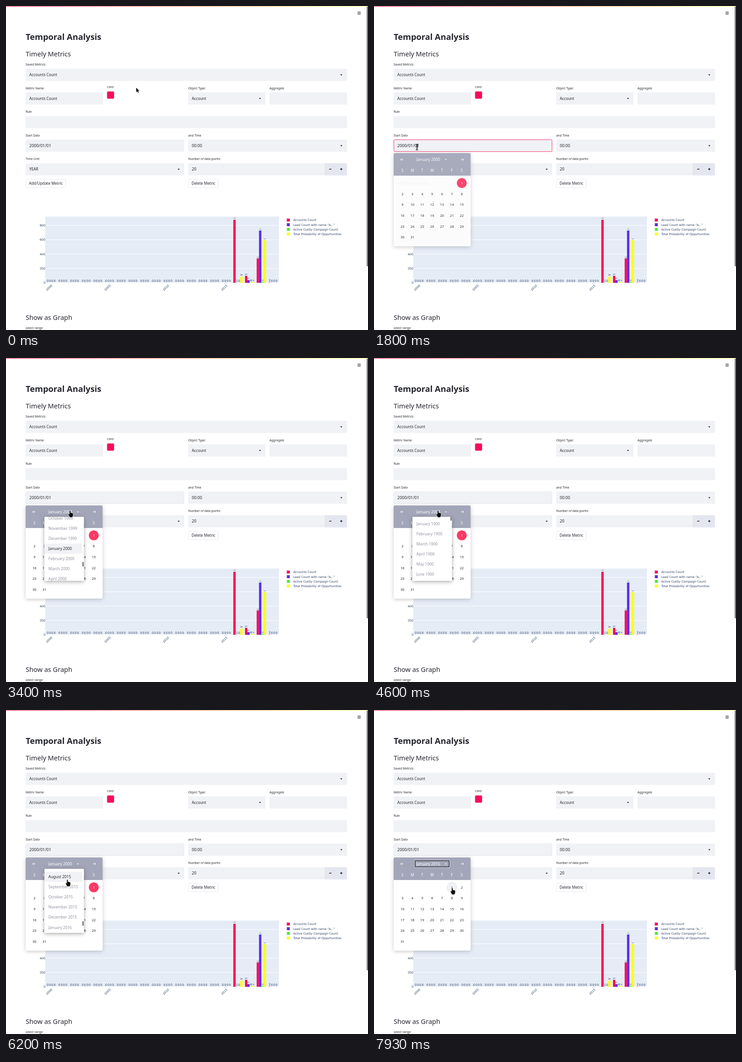
Write an HTML page with a canvas that moves like this. It is 792 px wide and 707 px high and loops after 8000 ms.

```html
<!DOCTYPE html>
<html lang="en">
<head>
<meta charset="utf-8">
<title>Temporal Analysis</title>
<style>
html, body { margin: 0; width: 100%; height: 100%; overflow: hidden; background: #fff; }
canvas { display: block; }
</style>
</head>
<body>
<canvas id="stage" width="792" height="707"></canvas>
<script>
const ctx = document.getElementById('stage').getContext('2d');
const LOOP = 8000, STEP = 200 / 3;
const SANS = '"Noto Sans", "Open Sans", sans-serif', CHART = '"DejaVu Sans", sans-serif';
const INK = '#262730', FIELD = '#f0f2f6', PINK = '#f63366', SLATE = '#2a3f5f';
const SERIES = [
  ['Accounts Count', '#f8065c'],
  ['Lead Count with name "A..."', '#5a2de0'],
  ['Active Costly Campaign Count', '#55ec38'],
  ['Total Probability of Opportunities', '#ffff00']
];
const COUNTS = { 16: [878, 1, 0, 86], 17: [97, 37, 4, 10], 18: [340, 728, 11, 597], 19: [3, 0, 0, 0] };
const MONTHS = ['January', 'February', 'March', 'April', 'May', 'June', 'July',
  'August', 'September', 'October', 'November', 'December'];

// Pointer path: time, x, y
const PATH = [
  [0, 285, 178], [330, 225, 290], [530, 150, 374], [667, 118, 366], [867, 185, 330],
  [1200, 94, 308], [2067, 94, 308], [2333, 150, 342], [2400, 150, 342], [2733, 140, 333],
  [6000, 140, 333], [6733, 119, 469], [7067, 119, 469], [7200, 119, 458], [7933, 171, 388]
];
// List jumps: time, active month counted from January 1900, its row centre
const JUMPS = [[3000, 1200, 416], [4600, 0, 362], [4860, 1200, 474.5], [5030, 1320, 474.5], [5320, 1392, 474.5]];
const OPEN = 1733, FOCUS = 2733, LIST = 3200, PICK = 7260;
const ROW = 22.07;

const clamp = v => Math.max(0, Math.min(1, v));

function box(x, y, x2, y2, fill, r = 2) {
  ctx.beginPath();
  ctx.roundRect(x, y, x2 - x, y2 - y, r);
  if (fill) { ctx.fillStyle = fill; ctx.fill(); }
}
function frame(x, y, x2, y2, color, width = 1, r = 2) {
  box(x, y, x2, y2, null, r);
  ctx.strokeStyle = color;
  ctx.lineWidth = width;
  ctx.stroke();
}
function line(color, width, ...pts) {
  ctx.beginPath();
  for (let i = 0; i < pts.length; i += 2) ctx.lineTo(pts[i], pts[i + 1]);
  ctx.strokeStyle = color;
  ctx.lineWidth = width;
  ctx.stroke();
}
function text(s, x, cy, size, { color = INK, align = 'left', weight = 400, family = SANS } = {}) {
  ctx.font = `${weight} ${size}px ${family}`;
  ctx.fillStyle = color;
  ctx.textAlign = align;
  ctx.fillText(s, x, cy + size * 0.36);
}
function caret(x, y, color = '#111') {
  ctx.fillStyle = color;
  ctx.beginPath();
  ctx.moveTo(x - 2.3, y - 1.1);
  ctx.lineTo(x + 2.3, y - 1.1);
  ctx.lineTo(x, y + 1.3);
  ctx.fill();
}
function shadowed(blur, alpha, draw) {
  ctx.save();
  ctx.shadowColor = `rgba(0,0,0,${alpha})`;
  ctx.shadowBlur = blur;
  ctx.shadowOffsetY = 2;
  draw();
  ctx.restore();
}
const label = (s, x, cy) => text(s, x, cy, 6.55);
function field(x, x2, y, value = '', drop = false, size = 8.27) {
  box(x, y, x2, y + 26.5, FIELD);
  text(value, x + 8, y + 13.3, size);
  if (drop) caret(x2 - 12.3, y + 13.4);
}
function button(s, x, x2) {
  frame(x + .5, 378, x2, 396.5, '#e6e8ef');
  text(s, x + 7.2, 387.3, 8.27);
}

function drawPage() {
  ctx.fillStyle = '#fff';
  ctx.fillRect(0, 0, 792, 707);
  const g = ctx.createLinearGradient(0, 0, 792, 0);
  g.addColorStop(0, PINK);
  g.addColorStop(1, '#fffd80');
  ctx.fillStyle = g;
  ctx.fillRect(0, 0, 792, 1.2);
  box(789, 1, 793, 568, '#808080', 1.5);
  for (const y of [13, 15.6, 18.2]) line('#333', 1.1, 769, y, 776, y);

  text('Temporal Analysis', 43, 67, 18.25, { weight: 700 });
  text('Timely Metrics', 43, 105, 14.55);
  label('Saved Metrics:', 43, 128);
  field(43, 746, 137, 'Accounts Count', true);
  label('Metric Name', 43, 179.5);
  field(43, 212.3, 188.5, 'Accounts Count');
  label('color', 221, 177);
  box(220.6, 186, 237, 202.8, '#f9b4cc', 2.5);
  box(221.3, 186.7, 236.3, 202.1, '#f50d5c');
  label('Object Type:', 398.7, 179.5);
  field(398.5, 568, 188.5, 'Account', true);
  label('Aggregate', 576.5, 179.5);
  field(576.5, 746, 188.5);
  label('Rule', 43, 231);
  field(43, 746, 240);
  label('Start Date', 43, 282.3);
  field(43, 390, 291.5, '2000/01/01', false, 9);
  label('and Time', 398.7, 282.3);
  field(398.5, 746, 291.5, '00:00', true, 8.8);
  label('Time Unit:', 43, 334);
  field(43, 390, 343, 'YEAR', true);
  label('Number of data points', 398.7, 334);
  field(398.5, 746, 343, '20', false, 8.8);
  box(697, 343, 746, 369.5, '#e4e6f0');
  line('#111', 1.3, 707, 356, 712, 356);
  line('#111', 1.3, 731, 356, 736, 356);
  line('#111', 1.3, 733.5, 353.5, 733.5, 358.5);
  button('Add/Update Metric', 43, 130.5);
  button('Delete Metric', 398.7, 464.5);
  text('Show as Graph', 43, 680, 14.55);
  label('select range', 43, 702.5);
}

function drawChart() {
  const left = 86, right = 597, base = 604, unit = 0.1566, size = 6.46;
  const year = (right - left) / 20, bar = year * 0.2;
  const font = { family: CHART, color: SLATE };
  ctx.fillStyle = '#e5ecf6';
  ctx.fillRect(left, 459.5, right - left, base - 459.5);
  for (let v = 0; v <= 800; v += 200) {
    const y = base - v * unit;
    line('#fff', 1, left, y, right, y);
    text(v, left, y, size, { ...font, align: 'right' });
  }
  for (let i = 0; i < 20; i++) {
    (COUNTS[i] || [0, 0, 0, 0]).forEach((v, k) => {
      const x = left + year * (i + 0.1) + bar * k, top = base - v * unit;
      ctx.fillStyle = SERIES[k][1];
      ctx.fillRect(x, top, bar, base - top);
      const s = Math.min(size, bar / (String(v).length * 0.636));
      text(v, x + bar / 2, top - s * 0.4 - 1.9, s, { ...font, align: 'center' });
    });
    if (i % 5 === 0) {
      ctx.save();
      ctx.translate(left + year * (i + 0.5) - 4.4, 614.7);
      ctx.rotate(-Math.PI / 4);
      text(2000 + i, 0, 0, size, { ...font, align: 'center' });
      ctx.restore();
    }
  }
  SERIES.forEach(([name, color], k) => {
    const y = 467 + k * 10.2;
    ctx.fillStyle = color;
    ctx.fillRect(614.4, y - 3.2, 6.5, 6.5);
    text(name, 628.4, y, size, font);
  });
}

function drawCalendar(t) {
  const u = clamp((t - OPEN + STEP) / 180), shown = 1 - (1 - u) ** 2;
  const picked = t >= PICK, white = { color: '#fff', align: 'center' };
  const colX = c => 62.3 + c * 21.62;
  ctx.save();
  ctx.globalAlpha = shown;
  ctx.translate(0, -11 * (1 - shown));
  shadowed(9, 0.2, () => box(43, 321.7, 211.4, 525, '#fff'));
  box(43, 321.7, 211.4, 371, '#a3a6b8', [2, 2, 0, 0]);
  for (const [x, d] of [[61.3, -1], [193, 1]]) {
    line('#fff', 1, x - 3 * d, 335.7, x + 3 * d, 335.7);
    line('#fff', 1, x + .4 * d, 333, x + 3 * d, 335.7, x + .4 * d, 338.4);
  }
  text(picked ? 'January 2016' : 'January 2000', 92.7, 335.7, 8.5, { color: '#fff', weight: 500 });
  caret(157.2, 336, '#fff');
  [...'SMTWTFS'].forEach((d, c) => text(d, colX(c), 360, 8, white));
  const first = picked ? 5 : 6;
  for (let d = 1; d <= 31; d++) {
    const cell = first + d - 1, x = colX(cell % 7), y = 387 + Math.floor(cell / 7) * 23.65;
    const selected = !picked && d === 1, hover = t > 7860 && d === 1;
    if (selected || hover) {
      ctx.beginPath();
      ctx.arc(x, y, 10.8, 0, 7);
      ctx.fillStyle = selected ? '#fb3a66' : FIELD;
      ctx.fill();
      if (hover) { ctx.strokeStyle = '#dcdee6'; ctx.lineWidth = 0.8; ctx.stroke(); }
    }
    text(d, x, y, 7.5, { align: 'center', color: selected ? '#fff' : INK });
  }
  if ((t >= FOCUS && t < LIST - 5) || picked) {
    frame(88.7, 327.7, 165.5, 343.3, '#fff', 1);
    frame(89.7, 328.7, 164.5, 342.3, '#10121a', 1.3);
  }
  ctx.restore();
}

function drawList(t, pointer) {
  const [since, anchor, anchorY] = JUMPS.filter(j => j[0] <= t).pop();
  const top = 346.6, bottom = 486.3;
  let active = anchor;
  if (t > 6000 && t < 7130 && pointer.y > top)
    active = Math.min(anchor, anchor + Math.round((pointer.y - anchorY) / ROW));
  const glow = clamp((t - since) / 200);
  ctx.save();
  ctx.globalAlpha = clamp((t - LIST + STEP + 5) / 260);
  shadowed(8, 0.35, () => box(84, top, 170.5, bottom, '#fff'));
  box(84, top, 170.5, bottom);
  ctx.clip();
  const alpha = ctx.globalAlpha;
  for (let k = -7; k <= 7; k++) {
    const i = anchor + k, y = anchorY + k * ROW;
    if (i < 0 || y < top - 12 || y > bottom + 12) continue;
    const name = `${MONTHS[i % 12]} ${1900 + Math.floor(i / 12)}`;
    text(name, 92.8, y, 8.41, { color: '#9192a0' });
    if (i === active) {
      ctx.globalAlpha = alpha * glow;
      ctx.fillStyle = '#f1f2f5';
      ctx.fillRect(84, y - ROW / 2, 83, ROW);
      text(name, 92.8, y, 8.41);
      ctx.globalAlpha = alpha;
    }
  }
  box(167, 345 + anchor / 12, 170, 355 + anchor / 12, '#808080', 1.2);
  ctx.restore();
}

function pointerAt(t) {
  const n = PATH.findIndex(p => p[0] > t);
  const b = PATH[n < 0 ? PATH.length - 1 : n], a = PATH[n < 0 ? PATH.length - 1 : n - 1];
  const u = a === b ? 0 : (t - a[0]) / (b[0] - a[0]);
  const x = a[1] + (b[1] - a[1]) * u, y = a[2] + (b[2] - a[2]) * u;
  let kind = 'arrow';
  if (y > 291 && y < 318 && x < 390 && t > 700 && t < 2400) kind = 'beam';
  else if (t > 2130 || (y > 343 && y < 369.5)) kind = 'hand';
  return { x, y, kind };
}

const ARROW = new Path2D('M0 0V9.6L2.3 7.6L3.9 11L5.6 10.2L4.1 6.9H7Z');
const HAND = new Path2D('M-1 .8Q0-.8 1 .8V4.8L2 4.5Q3 4.3 3.3 5.2Q4.6 4.7 5 5.8Q6.6 5.4 6.6 7V10' +
  'Q6.6 11.6 5.4 12.6V14.4H-.8V13Q-2 11.5-3.4 8.6Q-4 7.2-2.8 7Q-2 7-1 8.6Z');

function drawPointer({ x, y, kind }) {
  ctx.save();
  ctx.translate(x, y);
  if (kind === 'beam') {
    line('#111', 1.5, 0, -5.5, 0, 5.5);
    line('#111', 1.2, -2.6, -6, 2.6, -6);
    line('#111', 1.2, -2.6, 6, 2.6, 6);
  } else {
    const shape = kind === 'hand' ? HAND : ARROW;
    ctx.strokeStyle = '#fff';
    ctx.lineWidth = 1.2;
    ctx.stroke(shape);
    ctx.fillStyle = '#0c0c0c';
    ctx.fill(shape);
  }
  ctx.restore();
}

function render(now) {
  const t = Math.floor((now % LOOP + 5) / STEP) * STEP + 1;
  const pointer = pointerAt(t);
  drawPage();
  drawChart();
  if (t >= OPEN) {
    const focused = t < FOCUS;
    frame(43.5, 291.8, 389.5, 317.7, focused ? PINK : '#e6e8ee');
    if (focused) line(INK, 0.7, 95.5, 300, 95.5, 309.5);
    drawCalendar(t);
  }
  if (t >= LIST - 5 && t < PICK) drawList(t, pointer);
  drawPointer(pointer);
}

const start = performance.now();
function tick() {
  render(performance.now() - start);
  requestAnimationFrame(tick);
}
tick();
</script>
</body>
</html>
```
